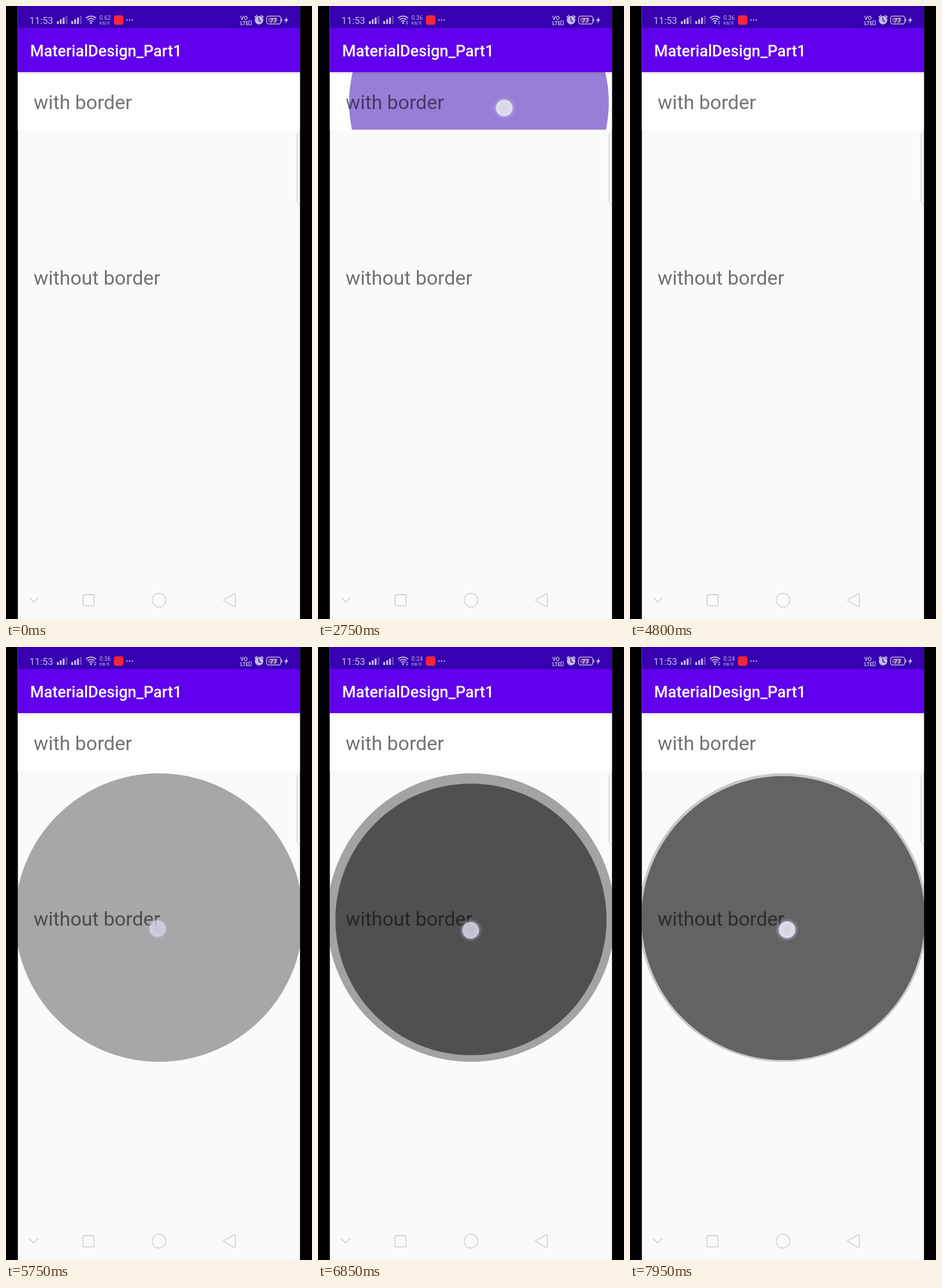
Animation of 529 by 1058 pixels, one loop 8000 ms. Source, as an HTML page with a canvas:

```html
<!DOCTYPE html>
<html lang="en">
<head>
<meta charset="utf-8">
<title>Ripple demo</title>
<style>
html, body { margin: 0; width: 100%; height: 100%; overflow: hidden; background: #000; }
canvas { display: block; width: 529px; height: 1058px; }
</style>
</head>
<body>
<canvas id="stage" width="529" height="1058"></canvas>
<script>
const ctx = document.getElementById('stage').getContext('2d');
const LOOP = 8000, STEP = 50;
const LEFT = 20.5, RIGHT = 508.5, WIDTH = RIGHT - LEFT;
const ICON = '#c5b5e6', LINE = '#c6c5c8', BACK = '#faf9fc';

// Ripple timing, in ms
const ENTER = 225, FADE_IN = 75, FADE_OUT = 150, DOT_FADE = 135;
const START_R = WIDTH * 0.3, FULL_R = 249;

const rows = {
  top: { x: 264.5, y: 163.5, rgb: '55,0,179' },
  low: { x: 264.5, y: 467, rgb: '0,0,0' }
};

const tap = (row, down, up, x, y) => ({ row, down, up, x, y });
const taps = [
  tap(rows.top, 1550, 2300, 335, 179),
  tap(rows.top, 2640, 2750, 322, 176),
  tap(rows.top, 2840, 2950, 310, 174),
  tap(rows.top, 3035, 3145, 298, 173),
  tap(rows.top, 3230, 3340, 286, 172),
  tap(rows.top, 3425, 3535, 278, 172),
  tap(rows.top, 3635, 3745, 295, 167),
  tap(rows.top, 3830, 4600, 300, 168),
  tap(rows.low, 5135, 5700, 262, 486),
  tap(rows.low, 5860, 5950, 263, 487),
  tap(rows.low, 6020, 6250, 265, 487),
  ...[6440, 6580, 6720, 6860, 7000, 7130, 7250, 7390, 7510, 7635]
    .map(t => tap(rows.low, t, t + 100, 264, 489)),
  tap(rows.low, 7780, 8000, 271.5, 488)
];

const clamp = v => Math.max(0, Math.min(1, v));
const mix = (a, b, p) => a + (b - a) * p;

// cubic-bezier(.4, 0, .2, 1)
function ease(t) {
  if (t <= 0 || t >= 1) return clamp(t);
  let lo = 0, hi = 1, s = 0.5;
  for (let i = 0; i < 24; i++) {
    const u = 1 - s;
    if (1.2 * u * u * s + 0.6 * u * s * s + s * s * s < t) lo = s; else hi = s;
    s = (lo + hi) / 2;
  }
  return 3 * (1 - s) * s * s + s * s * s;
}

function rect(x, y, w, h, color) {
  ctx.fillStyle = color;
  ctx.fillRect(x, y, w, h);
}

function round(x, y, w, h, r) {
  ctx.beginPath();
  ctx.roundRect(x, y, w, h, r);
}

function disc(x, y, r, color) {
  ctx.beginPath();
  ctx.arc(x, y, r, 0, Math.PI * 2);
  ctx.fillStyle = color;
  ctx.fill();
}

function path(points, close) {
  ctx.beginPath();
  points.forEach(([x, y]) => ctx.lineTo(x, y));
  if (close) ctx.closePath();
}

function stroke(color, width) {
  ctx.strokeStyle = color;
  ctx.lineWidth = width;
  ctx.stroke();
}

function text(str, x, y, size, color, weight = 400) {
  ctx.font = `${weight} ${size}px Roboto, sans-serif`;
  ctx.fillStyle = color;
  ctx.fillText(str, x, y);
}

function ripple(t, { row, down, up, x, y }) {
  const age = t - down;
  if (age < 0) return;
  const out = Math.max(up, down + ENTER);
  const alpha = 0.5 * clamp(age / FADE_IN) * (1 - clamp((t - out) / FADE_OUT));
  if (alpha <= 0) return;
  const p = ease(age / ENTER);
  disc(mix(x, row.x, p), mix(y, row.y, p), mix(START_R, FULL_R, p), `rgba(${row.rgb},${alpha})`);
}

function ripples(t, row, y, h) {
  ctx.save();
  ctx.beginPath();
  ctx.rect(LEFT, y, WIDTH, h);
  ctx.clip();
  taps.filter(a => a.row === row).forEach(a => ripple(t, a));
  ctx.restore();
}

function pointer(t, { down, up, x, y }) {
  const alpha = 1 - clamp((t - up) / DOT_FADE);
  if (t < down || alpha <= 0) return;
  ctx.save();
  ctx.globalAlpha = alpha;
  const halo = ctx.createRadialGradient(x, y, 13, x, y, 20);
  halo.addColorStop(0, 'rgba(190,180,225,.65)');
  halo.addColorStop(1, 'rgba(190,180,225,0)');
  disc(x, y, 20, halo);
  const body = ctx.createRadialGradient(x, y, 0, x, y, 14.5);
  body.addColorStop(0, 'rgba(226,223,232,.78)');
  body.addColorStop(1, 'rgba(236,234,242,.87)');
  disc(x, y, 14.5, body);
  stroke('rgba(170,160,195,.4)', 1);
  ctx.restore();
}

function signal(x) {
  [5, 8, 11, 14].forEach((h, i) =>
    rect(x + i * 5, 31 - h, 3.3, h, i < 3 ? ICON : 'rgba(197,181,230,.35)'));
}

function wifi(t) {
  ctx.lineCap = 'butt';
  [4.6, 8.6, 12.6].forEach(r => {
    ctx.beginPath();
    ctx.arc(147, 30, r, -Math.PI * 0.75, -Math.PI * 0.25);
    stroke(ICON, 2);
  });
  disc(147, 29.5, 1.7, ICON);
  if (t >= 1000) {
    ctx.fillStyle = ICON;
    path([[152, 28], [156, 28], [154, 25.5]], true);
    ctx.fill();
    path([[152, 29.5], [156, 29.5], [154, 32]], true);
    ctx.fill();
  }
}

function alarm() {
  ctx.lineCap = 'round';
  path([[430.5, 19], [433.5, 16.5]]);
  stroke(ICON, 2);
  path([[441.5, 16.5], [444.5, 19]]);
  stroke(ICON, 2);
  disc(437.5, 24.5, 7.3, ICON);
  path([[437.3, 20.5], [437.3, 25], [440.5, 26.5]]);
  stroke('#3a05ad', 1.6);
}

function battery() {
  round(450.5, 17.5, 24.5, 13.5, 3.5);
  stroke(ICON, 1.4);
  round(453, 20, 16, 8.5, 1.5);
  ctx.fillStyle = 'rgba(160,120,150,.55)';
  ctx.fill();
  rect(476, 21.5, 1.5, 5.5, ICON);
  text('77', 456, 28.5, 11, '#ead9e6', 500);
  path([[486, 18.5], [480.5, 25.5], [483.8, 25.5], [482.5, 30.5], [488.5, 23], [485, 23]], true);
  ctx.fillStyle = ICON;
  ctx.fill();
}

function statusBar(t) {
  rect(LEFT, 0, WIDTH, 38, '#3700b0');
  text('11:53', 40.5, 31, 16.5, ICON);
  signal(88);
  signal(112.8);
  wifi(t);
  text(t < 1900 ? '0.62' : t < 5900 ? '0.36' : '0.24', 161.5, 24, 10, ICON);
  text('KB/S', 161.5, 31.5, 7.8, ICON);
  round(186.5, 16, 16.5, 16.5, 4);
  ctx.fillStyle = '#f3263c';
  ctx.fill();
  [209, 213.7, 218.4].forEach(x => disc(x, 24.3, 1.2, ICON));
  text('VO', 405, 24, 9.5, ICON, 700);
  text('LTE', 405, 33, 9, ICON, 700);
  round(420, 25.5, 4, 7, 1);
  stroke(ICON, 1.2);
  alarm();
  battery();
}

function navBar() {
  ctx.lineJoin = 'round';
  ctx.lineCap = 'round';
  path([[40.5, 1021.5], [47.7, 1028.8], [55, 1021.5]]);
  stroke(LINE, 1.3);
  round(133, 1016, 19.3, 19.3, 2);
  stroke(LINE, 1.3);
  ctx.beginPath();
  ctx.arc(264.5, 1025.5, 11.8, 0, Math.PI * 2);
  stroke(LINE, 1.3);
  ctx.beginPath();
  ctx.moveTo(386, 1019.5);
  ctx.arcTo(396.5, 1013, 396.5, 1025, 2);
  ctx.arcTo(396.5, 1038, 376, 1025, 2);
  ctx.arcTo(375, 1025.3, 386, 1019.5, 1);
  ctx.closePath();
  stroke(LINE, 1.3);
}

function header() {
  const shade = ctx.createLinearGradient(0, 114, 0, 120);
  shade.addColorStop(0, 'rgba(0,0,0,.16)');
  shade.addColorStop(0.4, 'rgba(0,0,0,.05)');
  shade.addColorStop(1, 'rgba(0,0,0,0)');
  rect(LEFT, 114, WIDTH, 6, shade);
  rect(LEFT, 38, WIDTH, 76, '#6000ec');
  text('MaterialDesign_Part1', 41.8, 86.5, 27.1, '#fff', 500);
}

function draw(t) {
  rect(0, 0, 529, 1058, '#000');
  rect(LEFT, 0, WIDTH, 1058, BACK);
  rect(LEFT, 114, WIDTH, 100, '#fefefe');
  ripples(t, rows.low, 214, 844);
  ripples(t, rows.top, 114, 99.5);
  const ink = 'rgba(0,0,0,.55)';
  text('with border', 47.7, 177.5, 33.9, ink);
  text('without border', 47.7, 481.3, 33.9, ink);
  header();
  statusBar(t);
  navBar();
  round(503.3, 219, 20, 122, 5);
  stroke('#cbcacd', 1.2);
  rect(RIGHT, 0, 529 - RIGHT, 1058, '#000');
  taps.forEach(a => pointer(t, a));
}

const begin = performance.now();
function tick() {
  const t = (performance.now() - begin) % LOOP;
  draw(Math.floor(t / STEP) * STEP);
  requestAnimationFrame(tick);
}
tick();
</script>
</body>
</html>
```
